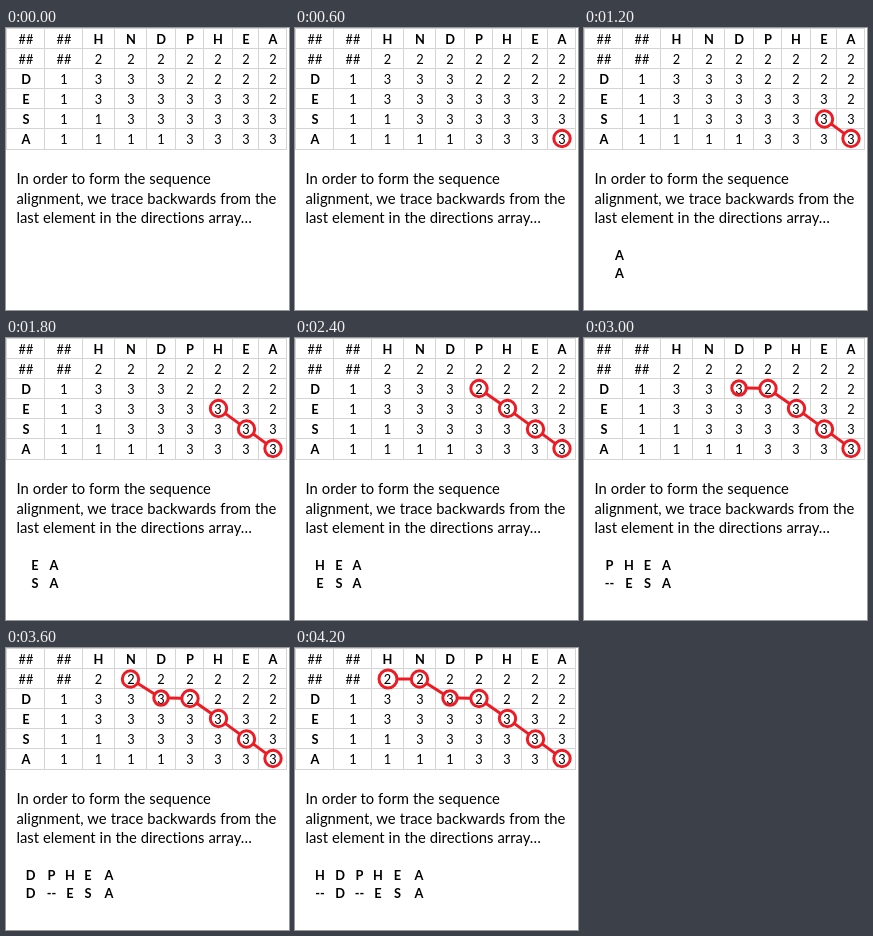
An HTML page that plays this animation: 283x282 px, repeating every 4800 ms.

```html
<!DOCTYPE html>
<html lang="en">
<head>
<meta charset="utf-8">
<title>Sequence alignment traceback</title>
<style>
  html, body { margin: 0; width: 100%; height: 100%; overflow: hidden; background: #fff; }
  svg { display: block; width: 283px; height: 282px; font-family: Lato, Carlito, sans-serif; font-variant-ligatures: none; }
  .cell { font-size: 12.8px; text-anchor: middle; }
  .bold { font-weight: 700; }
  .note { font-size: 14.8px; word-spacing: .2px; }
  .grid { stroke: #d4d4d4; fill: none; shape-rendering: crispEdges; }
  .mark { stroke: #ed1c24; stroke-width: 3; fill: none; }
</style>
</head>
<body>
<svg id="stage" viewBox="0 0 283 282"></svg>
<script>
const STEP = 600, STEPS = 8;
const stage = document.getElementById('stage');

function add(parent, tag, attrs, text) {
  const el = document.createElementNS('http://www.w3.org/2000/svg', tag);
  for (const key in attrs) el.setAttribute(key, attrs[key]);
  if (text) el.textContent = text;
  parent.appendChild(el);
  return el;
}

// Score table
const rows = ['##HNDPHEA', '##2222222', 'D13332222', 'E13333332', 'S11333333', 'A11113333'];
const colX = [20, 58, 92.5, 125, 155, 184, 212, 240, 267];
const linesX = [0, 38, 76, 108, 140, 169, 197, 226, 252, 280];
const rowTop = r => Math.floor(r * 121 / 6);

const grid = linesX.map(x => `M${x + .5} 0V122`);
for (let r = 0; r <= rows.length; r++) grid.push(`M0 ${rowTop(r) + .5}H281`);
add(stage, 'path', { class: 'grid', d: grid.join('') });
rows.forEach((row, r) => [...row].forEach((ch, c) => {
  const bold = /[A-Z]/.test(ch) ? ' bold' : '';
  add(stage, 'text', { class: 'cell' + bold, x: colX[c], y: rowTop(r) + 16 }, ch === '#' ? '##' : ch);
}));

['In order to form the sequence',
 'alignment, we trace backwards from the',
 'last element in the directions array…'].forEach((line, i) =>
  add(stage, 'text', { class: 'note', x: 10.5, y: 156 + i * 19.5 }, line));

// Traceback path, one circle (x, y, radius) per step
const path = [
  [267, 110.5, 8.2], [240.5, 91, 8.2], [212.5, 70.5, 8.2], [184, 50.5, 8.2],
  [155, 50, 7.2], [124.5, 31, 8.2], [93, 31, 9]
];
const marks = path.map(([x, y, r], i) => {
  const g = add(stage, 'g', { class: 'mark' });
  add(g, 'circle', { cx: x, cy: y, r });
  if (i) {
    const [px, py, pr] = path[i - 1];
    const d = Math.hypot(px - x, py - y), ux = (px - x) / d, uy = (py - y) / d;
    add(g, 'line', { x1: x + ux * r, y1: y + uy * r, x2: px - ux * pr, y2: py - uy * pr });
  }
  return g;
});

// Alignment so far: letter centres, upper and lower sequence
const pairs = [
  [[35.5], 'A', 'A'],
  [[29, 48], 'EA', 'SA'],
  [[25, 44, 62], 'HEA', 'ESA'],
  [[25.5, 45, 63.5, 82.5], 'PHEA', '-ESA'],
  [[24.5, 45.5, 64, 82, 103], 'DPHEA', 'D-ESA'],
  [[25, 45, 64.5, 83, 102.5, 124], 'HDPHEA', '-D-ESA']
].map(([xs, ...seqs]) => {
  const g = add(stage, 'g', { class: 'cell bold' });
  seqs.forEach((seq, r) => xs.forEach((x, i) =>
    add(g, 'text', { x, y: 232 + r * 18 }, seq[i] === '-' ? '--' : seq[i])));
  return g;
});

const show = (el, on) => { el.style.visibility = on ? 'visible' : 'hidden'; };

let shown = -1;
const start = performance.now();
function draw(now) {
  const step = Math.floor(Math.max(0, now - start) / STEP) % STEPS;
  if (step !== shown) {
    marks.forEach((g, i) => show(g, step > i));
    pairs.forEach((g, i) => show(g, step === i + 2));
    shown = step;
  }
  requestAnimationFrame(draw);
}
draw(start);
</script>
</body>
</html>
```
